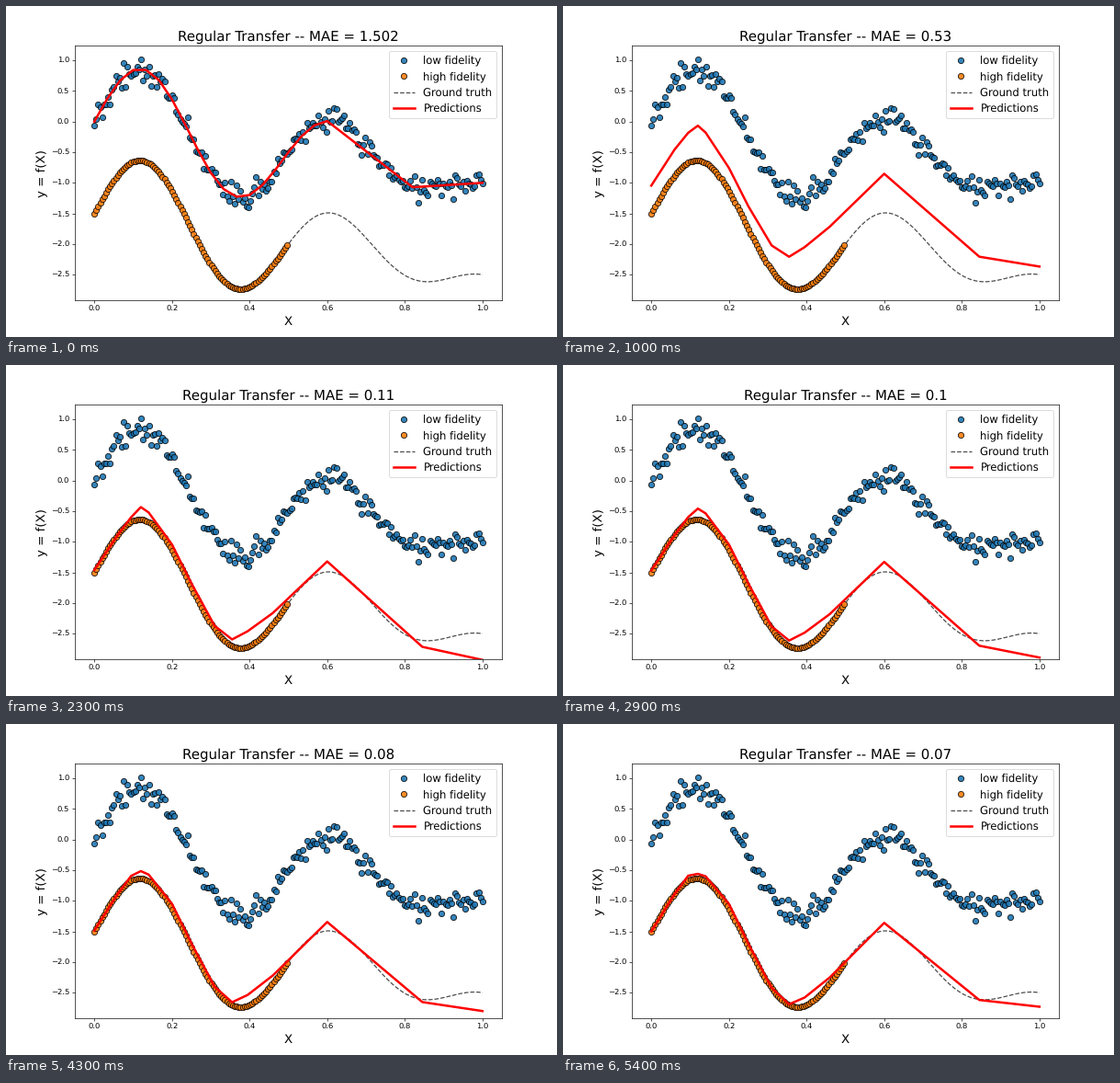
Animation of 600 by 360 pixels, one loop 5500 ms. Source, as a matplotlib script:

```python
import numpy as np
import matplotlib.pyplot as plt
from matplotlib.animation import FuncAnimation

W, H, DPI = 600, 360, 60
FRAMES, STEP_MS = 55, 100
LANDING = 15  # frame at which the quick descent turns into fine tuning
BLUE, ORANGE = "#1f77b4", "#ff7f0e"
plt.rcParams["font.family"] = "DejaVu Sans"
plt.rcParams["text.hinting"] = "none"


def truth(x):
    return (1 - x**2) * np.sin(4 * np.pi * x) - x


x = np.linspace(0, 1, 200)
noise = np.random.default_rng(4).normal(0, 0.1, x.size)
low = truth(x) + np.clip(noise, -0.23, 0.23)
high = truth(x) - 1.5

# Each prediction is a chain of straight pieces between a few bends.
grid = np.linspace(0, 1, 401)
fine = np.append(np.linspace(0, 0.6, 19), [0.82, 1])
bends = [0, .06, .095, .12, .14, .2, .25, .31, .355, .395, .46, .6, .845, 1]
shifting = [-.48, .15, .40, .40, .27, -.36, -.98, -1.55, -1.70, -1.52,
            -1.12, -.21, -1.46, -1.51]
landed = [-1.45, -.89, -.60, -.40, -.50, -1.04, -1.67, -2.36, -2.57, -2.43,
          -2.14, -1.31, -2.74, -2.98]
final = [-1.50, -.89, -.59, -.56, -.60, -1.05, -1.70, -2.42, -2.69, -2.58,
         -2.25, -1.36, -2.62, -2.73]
poses = [np.interp(grid, fine, truth(fine))]
poses += [np.interp(grid, bends, ys) for ys in (shifting, landed, final)]


def descent(frame):
    """Eased progress from the pretrained fit to the landing."""
    t = min(frame / LANDING, 1) ** 1.07
    return t * t * (3 - 2 * t)


def mean_error(frame):
    if frame < LANDING:
        return 1.502 - 1.362 * descent(frame)
    return 0.14 * (frame / LANDING) ** -0.541


def prediction(frame):
    phase = np.interp(descent(frame), [0, 0.317, 1], [0, 1, 2])
    phase += max(0, frame - LANDING) / (FRAMES - 1 - LANDING)
    i = min(int(phase), len(poses) - 2)
    return poses[i] + (phase - i) * (poses[i + 1] - poses[i])


fig, ax = plt.subplots(figsize=(W / DPI, H / DPI), dpi=DPI)
fig.subplots_adjust(left=0.125, right=0.9, bottom=0.11, top=0.88)
ax.set_xlim(-0.05, 1.05)
ax.set_ylim(-2.9237, 1.2392)
ax.set_xlabel("X", fontsize=16)
ax.set_ylabel("y = f(X)", fontsize=16)


def dots(xs, ys, color, label):
    ax.plot(xs, ys, "o", ms=7.5, mfc=color, mec="black", mew=1, alpha=0.9,
            label=label, zorder=3)


dots(x, low, BLUE, "low fidelity")
dots(x[:100], high[:100], ORANGE, "high fidelity")
ax.plot(x, high, "--", color="black", alpha=0.7, lw=1.5,
        label="Ground truth", zorder=2)
line, = ax.plot([], [], color="red", lw=3, label="Predictions", zorder=4)
ax.legend(loc="upper right", fontsize=14)
title = ax.set_title("", fontsize=18)


def draw(frame):
    line.set_data(grid, prediction(frame))
    error = round(float(mean_error(frame)), 2 if frame else 3)
    title.set_text(f"Regular Transfer -- MAE = {error}")
    return line, title


anim = FuncAnimation(fig, draw, frames=FRAMES, interval=STEP_MS,
                     repeat=True, repeat_delay=0, blit=False)
plt.show()
```
